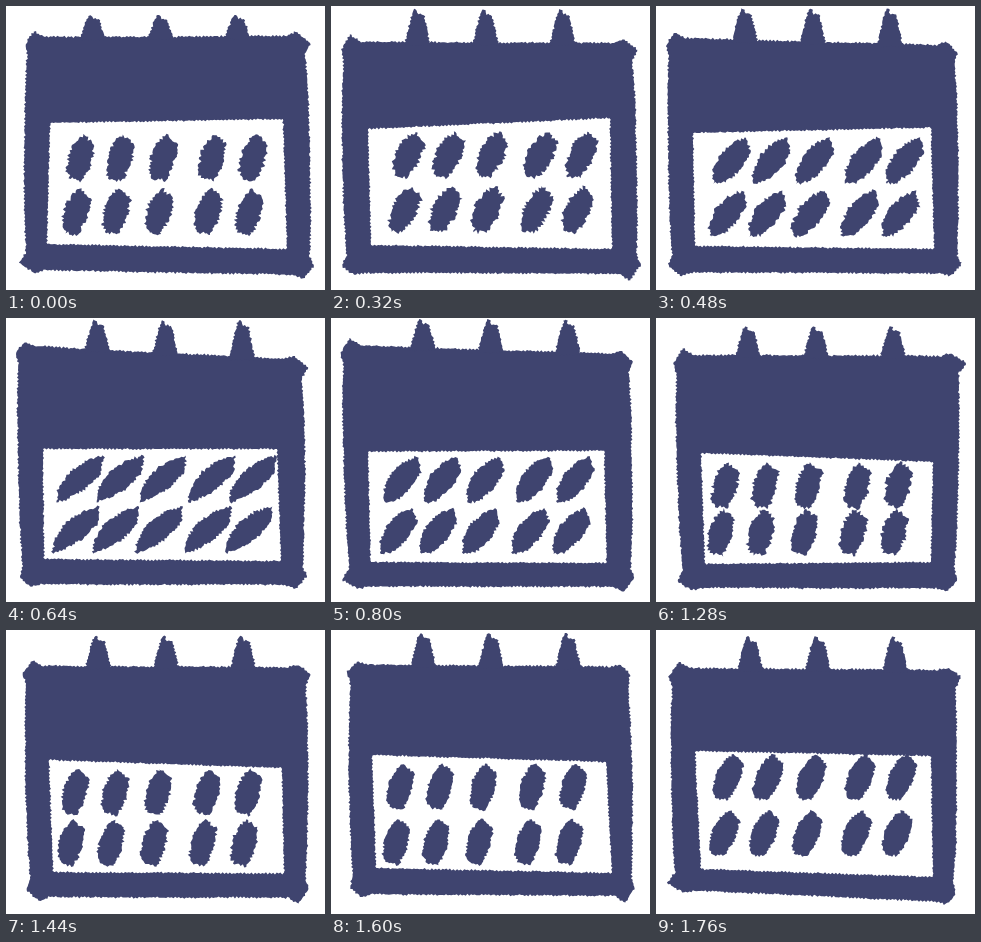
Recreate the animation shown at these times as an HTML page with a canvas. Size 319x284 px, loop 1.92 s.

```html
<!DOCTYPE html>
<html lang="en">
<head>
<meta charset="utf-8">
<title>Hand-drawn calendar</title>
<style>
html, body { margin: 0; width: 100%; height: 100%; overflow: hidden; background: #fff; }
canvas { display: block; }
</style>
</head>
<body>
<canvas id="stage" width="319" height="284"></canvas>
<script>
const STEP = 160, COUNT = 12;
const INK = '#3f446f';
const TAB_X = [90, 158, 235], TAB_W = 26;
const MARK_X = [70, 110, 153, 202, 243], MARK_H = 47;

// Key poses by step; the steps between are blended.
// body, hole: corners clockwise from top left. tabs: shift, top.
// marks: shift, middle height, row gap, slant, edge roughness.
const KEYS = [
  { at: 0, body: [21,31, 299,30, 304,269, 20,264], hole: [44,117, 277,113, 281,243, 41,238],
    tabs: [-3.5, 9], marks: [2.5, 179, 54, .15, 1.7] },
  { at: 2, body: [12,36, 301,37, 306,268, 16,267], hole: [37,123, 279,112, 281,243, 40,239],
    tabs: [-3.5, 3], marks: [6, 176.5, 55, .4, 1.9] },
  { at: 4, body: [12,27, 296,42, 297,267, 17,266], hole: [37,131, 271,131, 275,243, 38,241],
    tabs: [1, 2], marks: [1.5, 186.5, 51, 1, 1.2] },
  { at: 7, body: [11,27, 302,25, 305,272, 23,274], hole: [37,139, 278,136, 277,249, 43,250],
    tabs: [3, 0], marks: [-5, 190, 52, .05, 1] },
  { at: 8, body: [20,37, 303,38, 298,270, 27,270], hole: [45,135, 277,144, 275,244, 49,246],
    tabs: [2, 8], marks: [-2.5, 191, 47, .1, 1.8] },
  { at: 10, body: [19,34, 297,37, 301,266, 22,264], hole: [41,125, 275,132, 281,243, 45,238],
    tabs: [2, 3], marks: [-2.5, 184.5, 55, .1, 1] },
  { at: 11, body: [16,38, 300,40, 297,272, 19,260], hole: [39,121, 275,126, 277,247, 45,239],
    tabs: [4, 6], marks: [.5, 175.5, 56, .3, 1] }
];

// Unit shapes; marks lie between upright and leaning.
const TAB = [[0, 1], [.2, .38], [.34, .04], [.44, 0], [.54, .14], [.74, .16], [.87, .55], [1, 1]];
const UPRIGHT = [[.5, 0], [.95, .18], [.88, .6], [.6, 1], [.2, .94], [.02, .8], [.1, .38], [.3, .14]];
const LEANING = [[1, 0], [.96, .36], [.64, .7], [.25, .92], [.02, 1], [.06, .7], [.28, .36], [.65, .1]];

const lerp = (a, b, k) => a + (b - a) * k;
const mix = (a, b, k) => a.map((v, i) => lerp(v, b[i], k));
const corners = list => [0, 2, 4, 6].map(i => [list[i], list[i + 1]]);
const place = (shape, x, y, w, h) => shape.map(([u, v]) => [x + u * w, y + v * h]);

function random(seed) {
  let s = seed;
  return () => (s = (s * 16807) % 2147483647) / 2147483647;
}

function poseAt(step) {
  const next = KEYS.findIndex(key => key.at >= step);
  const b = KEYS[next], a = KEYS[Math.max(0, next - 1)];
  const k = (step - a.at) / (b.at - a.at || 1);
  const pose = {};
  for (const part of ['body', 'hole', 'tabs', 'marks']) pose[part] = mix(a[part], b[part], k);
  return pose;
}

// Brush box: sides bulge outwards and strokes overshoot at the corners.
function brushBox(box, rnd) {
  const pts = [];
  const dir = (p, q) => {
    const len = Math.hypot(q[0] - p[0], q[1] - p[1]);
    return [(q[0] - p[0]) / len, (q[1] - p[1]) / len];
  };
  box.forEach((c, i) => {
    const next = box[(i + 1) % 4];
    const d = dir(box[(i + 3) % 4], c), e = dir(c, next);
    const add = (u, v) => pts.push([c[0] + d[0] * u + e[0] * v, c[1] + d[1] * u + e[1] * v]);
    const spike = () => 2 + rnd() * 6;
    add(-18, 0);
    add(-9, -spike() * .6);
    add(-4, 0);
    add(spike(), 7);
    add(0, 18);
    const bulge = i % 2 ? 2.5 : 0;
    for (const t of [.25, .5, .75]) {
      const off = bulge * Math.sin(Math.PI * t) + rnd() - .5;
      pts.push([lerp(c[0], next[0], t) + e[1] * off, lerp(c[1], next[1], t) - e[0] * off]);
    }
  });
  return pts;
}

// Closed polygon with a fine toothed brush edge.
function addRough(path, pts, rnd, noise) {
  pts.forEach(([x, y], i) => {
    const [x2, y2] = pts[(i + 1) % pts.length];
    const dx = x2 - x, dy = y2 - y, len = Math.hypot(dx, dy) || 1;
    const steps = Math.max(1, Math.round(len / 1.8));
    for (let j = 0; j < steps; j++) {
      const k = j / steps;
      const off = (j % 2 ? .5 : -.5) + (rnd() - .5) * 2 * noise;
      const px = x + dx * k + dy / len * off, py = y + dy * k - dx / len * off;
      if (i + j) path.lineTo(px, py); else path.moveTo(px, py);
    }
  });
  path.closePath();
}

function build(step) {
  const { body, hole, tabs, marks } = poseAt(step);
  const rnd = random(7919 * (step + 1));
  const frame = new Path2D(), parts = new Path2D();
  const box = corners(body);
  addRough(frame, brushBox(box, rnd), rnd, .7);
  addRough(frame, corners(hole), rnd, .6);

  const [tabShift, tabTop] = tabs;
  const [[x0, y0], [x1, y1]] = box;
  for (const tabX of TAB_X) {
    const x = tabX + tabShift;
    const base = lerp(y0, y1, (x - x0) / (x1 - x0)) + 3;
    addRough(parts, place(TAB, x - TAB_W / 2, tabTop, TAB_W, base - tabTop), rnd, .7);
  }

  const [shift, middle, gap, slant, rough] = marks;
  const shape = UPRIGHT.map((p, i) => mix(p, LEANING[i], slant));
  const w = lerp(28, 48, slant);
  for (const side of [-1, 1]) {
    for (const markX of MARK_X) {
      const x = markX + shift - side * 2, y = middle + side * gap / 2;
      addRough(parts, place(shape, x - w / 2, y - MARK_H / 2, w, MARK_H), rnd, rough);
    }
  }
  return { frame, parts };
}

const poses = Array.from({ length: COUNT }, (_, step) => build(step));
const ctx = document.getElementById('stage').getContext('2d');
let shown = -1;

function render(time) {
  const step = Math.floor(time / STEP) % COUNT;
  if (step === shown) return;
  shown = step;
  ctx.fillStyle = '#fff';
  ctx.fillRect(0, 0, 319, 284);
  ctx.fillStyle = INK;
  ctx.fill(poses[step].frame, 'evenodd');
  ctx.fill(poses[step].parts);
}

const start = performance.now();
function tick() {
  render(performance.now() - start);
  requestAnimationFrame(tick);
}
tick();
</script>
</body>
</html>
```
